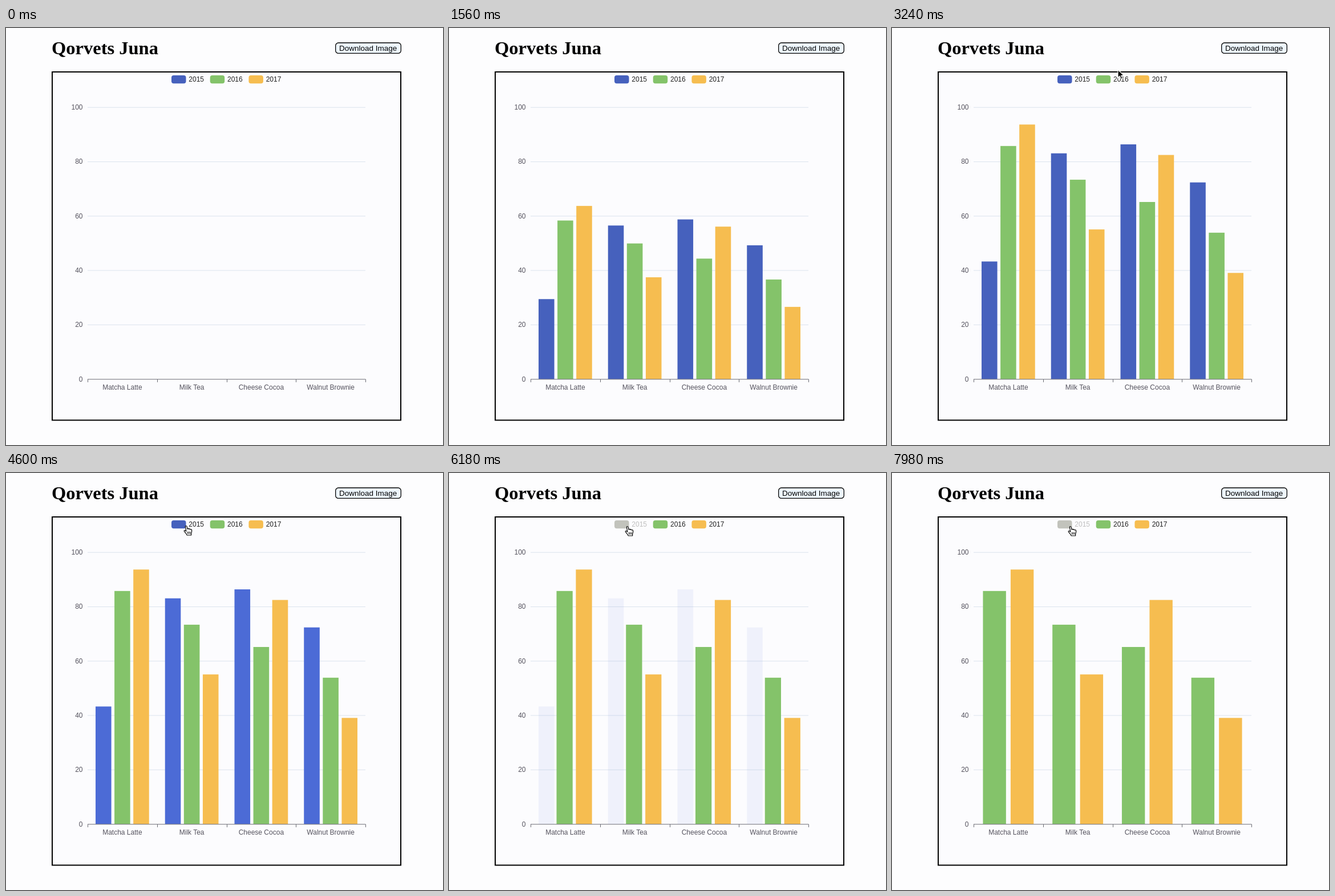
Write an HTML page that moves like this. It is 766x731 px and loops after 8 s.

```html
<!DOCTYPE html>
<html lang="en">
<head>
<meta charset="utf-8">
<title>Bar chart</title>
<style>
  html, body { margin: 0; width: 100%; height: 100%; overflow: hidden; background: #fdfdfe; }
  svg { display: block; width: 766px; height: 731px; }
  text { font: 12px "Liberation Sans", Arial, sans-serif; fill: #55535e; }
  .title { font: bold 32.5px "Liberation Serif", Times, serif; fill: #000; }
  .button { font-size: 13.5px; fill: #000; }
  .legend text { fill: #222; }
</style>
</head>
<body>
<svg id="stage" viewBox="0 0 766 731">
  <rect width="766" height="731" fill="#fdfdfe"/>
  <text class="title" x="80" y="46">Qorvets Juna</text>
  <rect x="577.7" y="26" width="114.6" height="18.4" rx="5" fill="#edf6fd" stroke="#000" stroke-width="1.3"/>
  <text class="button" x="584" y="39.7">Download Image</text>
  <rect x="81" y="77" width="611" height="610.5" fill="#fcfcfe" stroke="#000" stroke-width="2"/>
  <g id="grid"></g>
  <g id="bars"></g>
  <g id="axis"></g>
  <g id="legend" class="legend"></g>
  <g id="arrow">
    <path d="M0 0V14.2L3.3 11.2L5.6 16.5L8.2 15.4L5.9 10.3H10.3Z" fill="#000" stroke="#fff" stroke-width="1.2"/>
  </g>
  <g id="hand" stroke="#000" stroke-linejoin="round" stroke-linecap="round">
    <path d="M-1.6 1C-1.6 -.7 .9 -.7 1.2 1L2 5.2C2.5 4 4.4 4.2 4.7 5.5C5.3 4.6 7 4.9 7.2 6.1C8 5.4 9.5 5.9 9.6 7.2C9.9 10 9.5 11.2 8.6 13V16H1.1C.6 13.5 -1.5 11.9 -3.5 9.3C-4.4 7.9 -2.8 6.9 -1.5 8L-.2 9.2Z" fill="#fff" stroke-width="1.2"/>
    <path d="M2.5 10.2V13.4M4.7 10.2V13.4M6.9 10.2V13.4" fill="none"/>
  </g>
</svg>
<script>
const LOOP = 8000;
const LEFT = 143, BASE = 615.6, UNIT = 4.764, CAT = 121.75;
const GROW = { start: 45, span: 2663 };
const CLICK = 5720, RELAYOUT = 1957, FADE = 783;
const names = ["Matcha Latte", "Milk Tea", "Cheese Cocoa", "Walnut Brownie"];
const series = [
  { year: "2015", color: [70, 97, 189], values: [43.3, 83.1, 86.4, 72.4] },
  { year: "2016", color: [132, 195, 106], values: [85.8, 73.4, 65.2, 53.9] },
  { year: "2017", color: [246, 189, 80], values: [93.7, 55.1, 82.5, 39.1] }
];
const HOVER_BLUE = [76, 107, 214];

const $ = id => document.getElementById(id);
const set = (el, attrs) => { for (const k in attrs) el.setAttribute(k, attrs[k]); };
const add = (parent, tag, attrs, label) => {
  const el = document.createElementNS("http://www.w3.org/2000/svg", tag);
  set(el, attrs);
  if (label !== undefined) el.textContent = label;
  return parent.appendChild(el);
};
const mix = (a, b, k) => a + (b - a) * k;
const rgb = c => `rgb(${c.map(Math.round)})`;
const progress = (t, start, span) => Math.min(1, Math.max(0, (t - start) / span));
const inOut = p => p < .5 ? 4 * p ** 3 : 1 - 4 * (1 - p) ** 3;
const out = p => 1 - (1 - p) ** 3;

// Bar width and offset inside a category for a number of visible series.
function layout(count) {
  const room = CAT * (1 - (35 - 4 * count) / 100);
  const width = room / (count + .2 * (count - 1));
  return { width, step: width * 1.2, offset: (CAT - room) / 2 };
}
const three = layout(3), two = layout(2);

for (let v = 0; v <= 100; v += 20) {
  const y = BASE - v * UNIT;
  if (v) add($("grid"), "path", { d: `M${LEFT} ${y.toFixed(1)}H630`, stroke: "#dbe3ed" });
  add($("axis"), "text", { x: 134.5, y: y + 4, "text-anchor": "end" }, v);
}
add($("axis"), "path", { d: `M${LEFT} 615.8H630.5`, stroke: "#6b6c74" });
for (let i = 0; i <= 4; i++)
  add($("axis"), "path", { d: `M${Math.round(LEFT + i * CAT) + .5} 616v5`, stroke: "#6b6c74" });
names.forEach((name, i) =>
  add($("axis"), "text", { x: LEFT + (i + .5) * CAT, y: 634, "text-anchor": "middle" }, name));

series.forEach((s, k) => {
  const x = 290 + k * 67.7;
  s.icon = add($("legend"), "rect", { x, y: 83, width: 25.5, height: 14.2, rx: 4, fill: rgb(s.color) });
  s.label = add($("legend"), "text", { x: x + 30.3, y: 94.4 }, s.year);
  s.bars = s.values.map(() => add($("bars"), "rect", { fill: rgb(s.color) }));
});

function pointer(t) {
  const enter = out(progress(t, 2840, 380));
  const move = inOut(progress(t, 3400, 900));
  const nudge = progress(t, 5000, 60);
  return {
    x: mix(mix(10, 396, enter), 316, move) - 3 * nudge,
    y: mix(mix(33, 73, enter), 93, move) + nudge
  };
}

function draw(t) {
  const grown = inOut(progress(t, GROW.start, GROW.span));
  const shift = inOut(progress(t, CLICK, RELAYOUT));
  const fade = 1 - out(progress(t, CLICK, FADE));
  const glow = out(progress(t, 3880, 400));
  const off = t >= CLICK;

  series.forEach((s, k) => {
    const keep = k > 0;
    const width = keep ? mix(three.width, two.width, shift) : three.width;
    const from = three.offset + k * three.step;
    const x = keep ? mix(from, two.offset + (k - 1) * two.step, shift) : from;
    s.bars.forEach((bar, i) => {
      const height = s.values[i] * UNIT * grown;
      set(bar, { x: LEFT + i * CAT + x, y: BASE - height, width, height });
      if (!keep) set(bar, {
        opacity: fade,
        fill: rgb(s.color.map((c, n) => mix(c, HOVER_BLUE[n], glow)))
      });
    });
  });
  set(series[0].icon, { fill: off ? "#c2c3bc" : rgb(series[0].color) });
  series[0].label.style.fill = off ? "#bfbfbf" : "";

  const { x, y } = pointer(t);
  const over = x < 348 && y > 83;
  const at = `translate(${x} ${y})`;
  set($("arrow"), { transform: at, visibility: t >= 2840 && !over ? "visible" : "hidden" });
  set($("hand"), { transform: at, visibility: over ? "visible" : "hidden" });
}

const begin = performance.now();
function tick() {
  draw((performance.now() - begin) % LOOP);
  requestAnimationFrame(tick);
}
draw(0);
requestAnimationFrame(tick);
</script>
</body>
</html>
```
